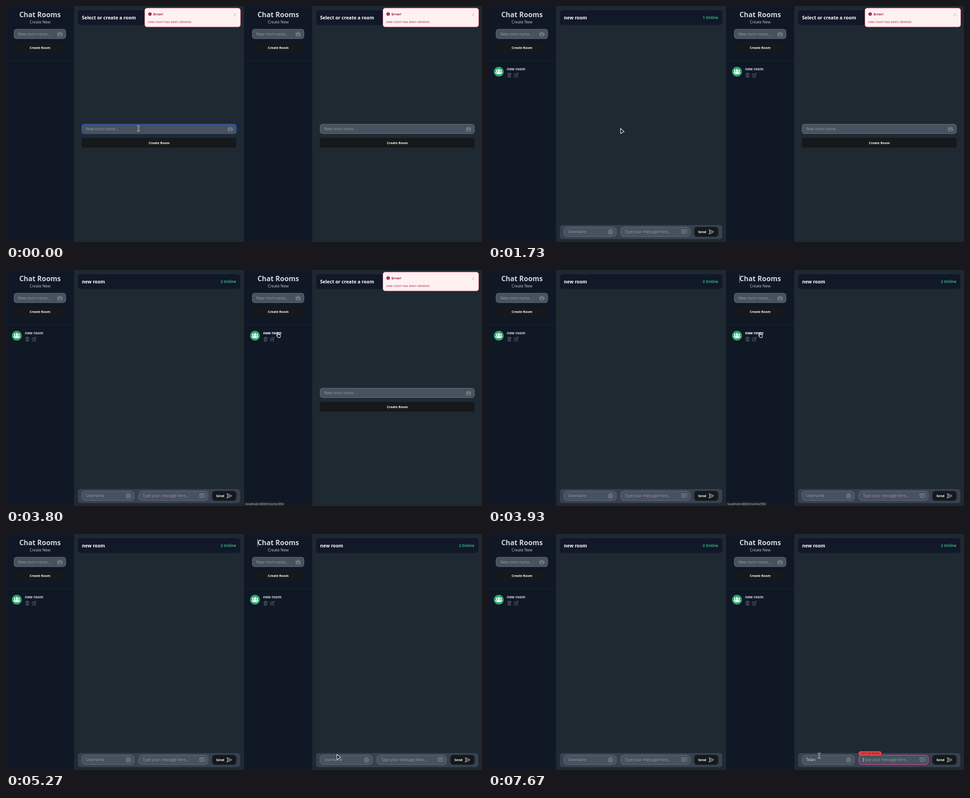
Recreate the animation shown at these times as an HTML page with a canvas. Size 1060 by 528 pixels, loop 8000 ms.

```html
<!DOCTYPE html>
<html lang="en">
<head>
<meta charset="utf-8">
<title>Chat Rooms</title>
<style>
  html, body { margin: 0; width: 100%; height: 100%; overflow: hidden; background: #1f2932; }
  canvas { display: block; width: 1060px; height: 528px; }
</style>
</head>
<body>
<canvas id="stage" width="1060" height="528"></canvas>
<script>
const ctx = document.getElementById('stage').getContext('2d');
const LOOP = 8000, PANEL = 530.5;
const C = {
  main: '#1f2932', side: '#101725', line: '#1c2635', bar: '#374150',
  field: '#48525e', edge: '#68727e', hint: '#929aa4', icon: '#a3aab2',
  button: '#15191b', light: '#d1d5db', green: '#2fb37e', avatar: '#28a56c',
  rose: '#9f1239', focus: '#2359d6', invalid: '#b34a8c'
};

// [time, text] pairs; the latest reached entry is shown
const ROOM_TYPING = [[0, ''], [70, 'n'], [130, 'ne'], [200, 'new'], [400, 'new '],
  [730, 'new r'], [870, 'new ro'], [1000, 'new roo'], [1200, 'new room']];
const USER_TYPING = [[0, ''], [6070, 'T'], [6200, 'Te'], [6530, 'Tel'], [6800, 'Tela'], [7270, 'Telan']];

// Pointer hot spot: [time, x, y]
const POINTER = [[0, 295, 274], [2130, 295, 274], [2600, 515.5, 193.5], [2800, 515.5, 193.5],
  [3270, 613, 152], [3530, 605.5, 139.5], [4000, 605.5, 139.5], [4200, 670, 249.5],
  [4400, 670, 249.5], [4670, 719.5, 415.5], [4800, 719.5, 415.5], [5330, 737.5, 496], [LOOP, 737.5, 496]];

const between = (t, a, b) => t >= a && t < b;
const inside = (p, x, y, w, h) => p.x >= x && p.x <= x + w && p.y >= y && p.y <= y + h;
const typed = (list, t) => list.filter(e => e[0] <= t).pop()[1];

function pointerAt(t) {
  const i = Math.max(1, POINTER.findIndex(k => k[0] >= t));
  const [t0, x0, y0] = POINTER[i - 1], [t1, x1, y1] = POINTER[i];
  const u = (t - t0) / (t1 - t0), e = u * u * (3 - 2 * u);
  return { x: x0 + (x1 - x0) * e, y: y0 + (y1 - y0) * e };
}

function box(x, y, w, h, r, fill, stroke, width = 1) {
  ctx.beginPath();
  ctx.roundRect(x, y, w, h, r);
  ctx.fillStyle = fill;
  ctx.fill();
  if (stroke) outline(stroke, width);
}

function outline(color, width = 0.8) {
  ctx.strokeStyle = color;
  ctx.lineWidth = width;
  ctx.stroke();
}

function text(str, x, y, size, color, bold = false, align = 'left') {
  ctx.font = `${bold ? 700 : 400} ${size}px "Open Sans", "Noto Sans", sans-serif`;
  ctx.fillStyle = color;
  ctx.textAlign = align;
  ctx.fillText(str, x, y);
  return ctx.measureText(str).width;
}

// Strokes SVG path data around a centre point
function icon(path, x, y, color, width = 0.8, fill) {
  ctx.save();
  ctx.translate(x, y);
  ctx.lineJoin = ctx.lineCap = 'round';
  const p = new Path2D(path);
  if (fill) { ctx.fillStyle = fill; ctx.fill(p); }
  if (color) { ctx.strokeStyle = color; ctx.lineWidth = width; ctx.stroke(p); }
  ctx.restore();
}

const ICON = {
  users: 'M-1.9 -2.6a1.9 1.9 0 1 0 3.8 0a1.9 1.9 0 1 0 -3.8 0M-3.3 4.4v-1.6a3.3 2.9 0 0 1 6.6 0v1.6z' +
    'M-2.5 -.9a1.4 1.4 0 1 1 -1.2 -2.2M2.5 -.9a1.4 1.4 0 1 0 1.2 -2.2M-3.6 3.2h-1.9v-1.4q.2 -1.9 2.3 -1.9M3.6 3.2h1.9v-1.4q-.2 -1.9 -2.3 -1.9',
  crowd: 'M-2.9 -3.4a2.9 3.1 0 1 1 5.8 0q0 2.2 -1.4 3.3q4.1 .9 4.1 4.2v1.4h-11.2v-1.4q0 -3.3 4.1 -4.2q-1.4 -1.1 -1.4 -3.3z' +
    'M-3.6 -5.5q-3.1 -.8 -3.2 2.3q.1 2 1.1 2.8q-2.7 .8 -2.7 3.9h2.4q.3 -2.6 3 -3.8q-1.5 -2.6 -.6 -5.2z' +
    'M3.6 -5.5q3.1 -.8 3.2 2.3q-.1 2 -1.1 2.8q2.7 .8 2.7 3.9h-2.4q-.3 -2.6 -3 -3.8q1.5 -2.6 .6 -5.2z',
  person: 'M-5.3 0a5.3 5.3 0 1 0 10.6 0a5.3 5.3 0 1 0 -10.6 0M-2 -1.2a2 2 0 1 0 4 0a2 2 0 1 0 -4 0M-3.5 3.8q.6 -2.4 3.5 -2.4t3.5 2.4',
  bubble: 'M-4.6 -4.6h9.2q1 0 1 1v5.4q0 1 -1 1h-3.2l-2.6 2.3v-2.3h-3.4q-1 0 -1 -1v-5.4q0 -1 1 -1zM-2.8 -2h5.6M-2.8 .2h3.4',
  plane: 'M-3.3 0L-5 -4.8Q.8 -3.2 5.4 0Q.8 3.2 -5 4.8zM-3.3 0h4',
  trash: 'M-4 -3.3h8M-1.5 -3.5v-1.2h3v1.2M-3.2 -3.1l.5 7.6h5.4l.5 -7.6M-1.1 -1.4l.1 4.3M1.1 -1.4l-.1 4.3',
  edit: 'M1 -3.2h-4q-1.2 0 -1.2 1.2v5q0 1.2 1.2 1.2h5q1.2 0 1.2 -1.2v-3.6M-1.2 1.2l.5 -2l4 -4q.7 -.5 1.3 .1t.1 1.3l-4 4z',
  arrow: 'M0 0L8 6.8Q8.3 7.4 7.4 7.6L4 8.4L1.2 11.6Q.5 12 .4 11.2z',
  hand: 'M-1 .4q1 -1 1.7 .2v4.3q.9 -.8 1.6 .2q1 -.6 1.6 .3q1.3 -.5 1.7 .8v2.4q0 1.3 -.8 3h-4.7q-.8 -1.8 -3 -4.3q0 -1.3 1.3 -.9l.6 .7z',
  beam: 'M-2.2 -5.5q1.8 0 2.2 .9q.4 -.9 2.2 -.9M0 -4.6v9.2M-2.2 5.5q1.8 0 2.2 -.9q.4 .9 2.2 .9'
};

function caret(x, y, h = 9) {
  ctx.fillStyle = '#e5e7eb';
  ctx.fillRect(x, y - h / 2, 0.8, h);
}

function field(x, y, w, { hint, value = '', glyph, border, cursor, r = 5 }) {
  box(x + 0.5, y + 0.5, w - 1, 21, r, C.field, border || C.edge, border ? 1.5 : 1);
  const width = text(value || hint, x + 9.5, y + 14, 8.4, value ? '#dfe2e6' : C.hint);
  if (cursor) caret(x + 9.5 + (value ? width : 0), y + 11);
  icon(glyph, x + w - 13.5, y + 11, C.icon, 0.75);
}

function sidebar(v) {
  box(0, 0, 151.5, 528, 0, C.side);
  text('Chat Rooms', 75.7, 25.2, 15.5, C.light, true, 'center');
  text('Create New', 75.7, 39, 8.6, '#c3c8cf', false, 'center');
  if (v.titleCaret) caret(29.3, 19.5, 18);
  field(17.5, 51.5, 116, { hint: 'New room name...', glyph: ICON.users });
  box(17.5, 83, 116, 21, 4, C.button);
  text('Create Room', 75.7, 96, 7.2, '#fff', true, 'center');
  box(0, 122, 151.5, 1, 0, C.line);
  if (!v.listed) return;
  ctx.beginPath();
  ctx.arc(24, 147, 11, 0, Math.PI * 2);
  ctx.fillStyle = C.avatar;
  ctx.fill();
  icon(ICON.crowd, 24, 147.3, C.avatar, 0.5, '#fff');
  text('new room', 42, 143.5, 8.2, v.hover ? '#fff' : C.light, true);
  icon(ICON.trash, 47.5, 155, '#77808b', 0.75);
  icon(ICON.edit, 62.5, 155, '#77808b', 0.75);
}

function lobby(v) {
  text('Select or create a room', 169, 29.6, 10.45, '#fff', true);
  field(168.5, 264, 344.5, {
    hint: 'New room name...', value: v.roomName, glyph: ICON.users,
    border: v.roomFocus && C.focus, cursor: v.roomName
  });
  box(168.5, 295, 344.5, 22, 4, v.creating ? '#1a2025' : C.button);
  text(v.creating ? 'Creating...' : 'Create Room', 341, 308.7, 7.25, v.creating ? '#b3b8bc' : '#fff', true, 'center');
}

function chat(v) {
  text('new room', 169, 29.6, 10.3, '#fff', true);
  text(`${v.online} Online`, 512.5, 29, 8.35, C.green, true, 'right');
  box(160, 490, 361.5, 31.5, 6, C.bar);
  field(168.5, 494.3, 117.5, {
    hint: 'Username', value: v.user, glyph: ICON.person, r: 7,
    border: v.userFocus && C.focus, cursor: v.userCaret
  });
  field(295, 494.3, 155.5, {
    hint: 'Type your message here...', glyph: ICON.bubble, r: 7,
    border: v.messageBorder, cursor: v.messageBorder
  });
  box(459, 494.3, 54, 22, 7, C.button);
  text('Send', 468, 508.2, 7.4, '#fff', true);
  icon(ICON.plane, 497.3, 505.3, '#fff', 0.9);
  if (v.messageBorder) {
    box(295, 486, 50.5, 9.5, 4.5, '#ef4444');
    text("can't be blank", 320.2, 493, 6.55, '#25171c', false, 'center');
  }
}

function toast(alpha) {
  if (!alpha) return;
  ctx.save();
  ctx.globalAlpha = alpha;
  box(309, 4.8, 213, 42, 5, '#fff1f2', '#f58a9c', 1);
  ctx.beginPath();
  ctx.arc(320.5, 18, 3.7, 0, Math.PI * 2);
  ctx.fillStyle = C.rose;
  ctx.fill();
  icon('M0 -1.9v2M0 1.8v.1', 320.5, 18, '#fff1f2', 0.9);
  text('Error!', 328, 20.9, 7.8, C.rose, true);
  text('new room has been deleted.', 316, 37.5, 7.4, '#a8284b');
  icon('M-2.9 -2.9l5.8 5.8M2.9 -2.9l-5.8 5.8', 509.5, 19.5, '#b9a3a8', 0.8);
  ctx.restore();
}

function panel(x, v) {
  ctx.save();
  ctx.translate(x, 0);
  box(0, 0, 530.5, 528, 0, C.main);
  sidebar(v);
  box(160, 9.5, 361.5, 33, 6, '#111827');
  (v.chat ? chat : lobby)(v);
  toast(v.toast);
  ctx.restore();
}

function drawPointer(p, kind) {
  if (kind === 'beam') {
    icon(ICON.beam, p.x, p.y, '#fff', 2.2);
    icon(ICON.beam, p.x, p.y, '#111', 0.9);
  } else {
    icon(ICON[kind], p.x, p.y, '#fff', 1.1, '#111');
  }
}

function draw(t) {
  const p = pointerAt(t);
  const joined = t >= 3870;
  const hover = t >= 1600 && inside(p, 572, 134, 42, 14);
  panel(0, {
    listed: t >= 1670, chat: t >= 1670,
    titleCaret: between(t, 2270, 2870) || between(t, 3470, 3800),
    roomName: typed(ROOM_TYPING, t), roomFocus: t < 1600, creating: t >= 1600,
    online: t < 3800 ? 1 : 2, toast: t < 1670 ? 1 : t < 1730 ? 0.5 : 0
  });
  panel(PANEL, {
    listed: t >= 1600, chat: joined, hover,
    titleCaret: between(t, 3870, 4470) || between(t, 5070, 5400),
    online: 2, toast: !joined ? 1 : t < 3930 ? 0.5 : 0,
    user: typed(USER_TYPING, t), userFocus: between(t, 5400, 7600),
    userCaret: between(t, 5400, 5930) || between(t, 6070, 7600),
    messageBorder: t >= 7670 ? C.invalid : t >= 7600 ? '#8d5f86' : ''
  });
  if (between(t, 3670, 4470)) {
    box(530.5, 518, 91, 10, [0, 3, 0, 0], '#1b1f26');
    text('localhost:4000/rooms/354', 533, 526, 7, '#d0d3d7');
  }
  const overField = t < 1670 || (joined && inside(p, 699, 494, 117.5, 23));
  drawPointer(p, overField ? 'beam' : hover ? 'hand' : 'arrow');
}

function tick() {
  const step = Math.floor((performance.now() % LOOP + 5) * 15 / 1000);
  draw(Math.min(Math.round(step * 20 / 3) * 10, LOOP - 1));
  requestAnimationFrame(tick);
}
tick();
</script>
</body>
</html>
```
